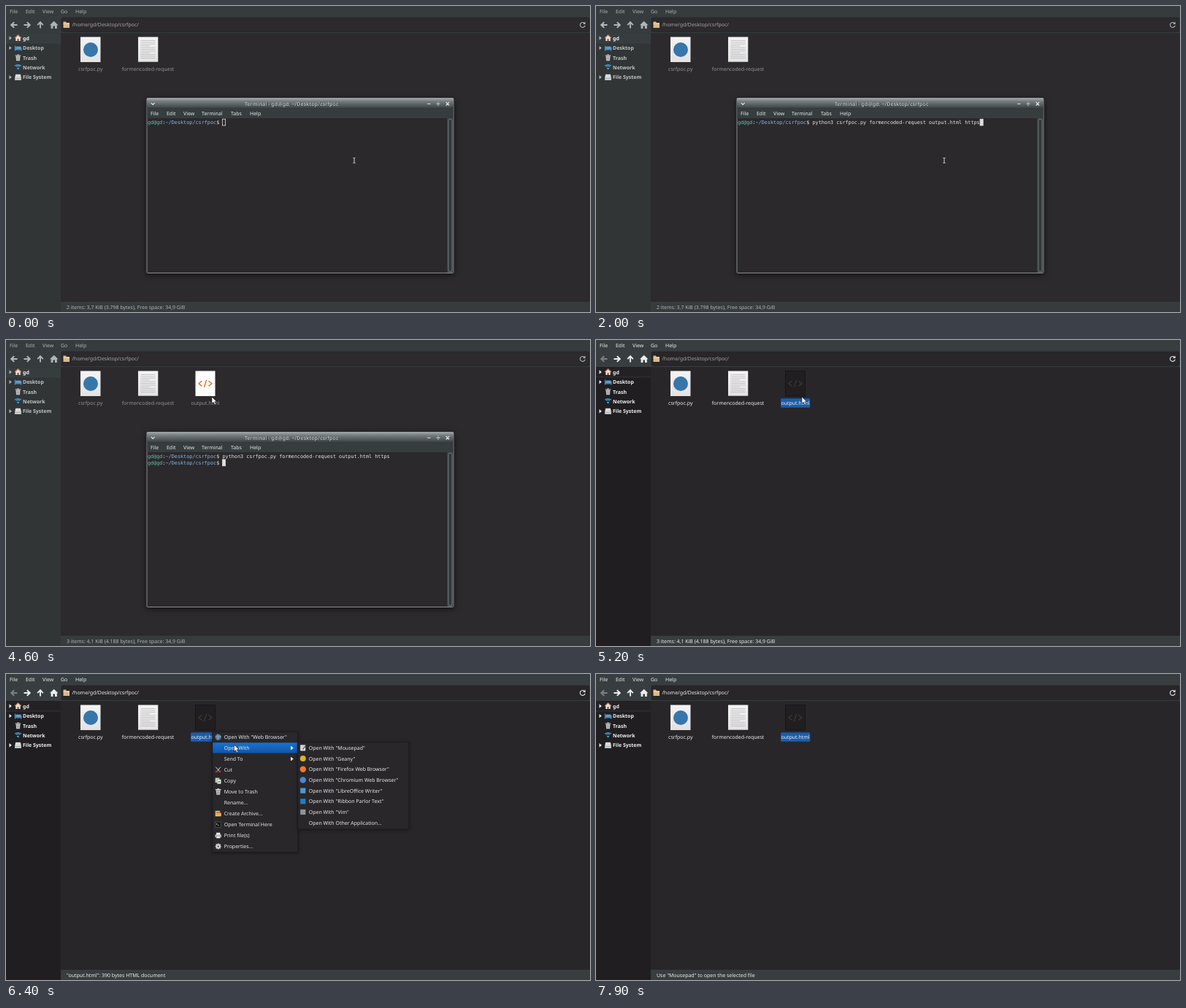
Write an HTML page that moves like this. It is 800 by 420 pixels and loops after 8000 ms.

```html
<!DOCTYPE html>
<html lang="en">
<head>
<meta charset="utf-8">
<title>File manager and terminal</title>
<style>
html, body { margin: 0; width: 100%; height: 100%; overflow: hidden; background: #282629; }
svg { display: block; width: 100vw; height: 100vh; font: 6.97px "Noto Sans", sans-serif; text-rendering: geometricPrecision;
  --bar: #363c3e; --side: #323536; --row: #373d3f; --bg: #2c2a2d; --text: #afb5b7; --label: #929193; --bold: #c0c7c9; --back: #b4babc; --path: #a4a4a6; }
svg.focused { --bar: #383e40; --side: #201e20; --row: #232123; --bg: #282629; --text: #eceeee; --label: #eceeee; --bold: #f0f2f2; --back: #7c8082; }
text { fill: var(--text); white-space: pre; }
.bold { font-weight: 700; }
.mono { font: 6.81px "DejaVu Sans Mono", monospace; fill: #e4e4e4; }
.light { fill: #e8eaea; }
</style>
</head>
<body>
<svg id="stage" viewBox="0 0 800 420" preserveAspectRatio="none">
  <defs>
    <linearGradient id="title" x2="0" y2="1">
      <stop stop-color="#a4a9aa"/><stop offset=".3" stop-color="#777d7f"/><stop offset="1" stop-color="#3a4143"/>
    </linearGradient>
    <linearGradient id="blue" x2="0" y2="1"><stop stop-color="#1c70cf"/><stop offset="1" stop-color="#0d57ac"/></linearGradient>
    <linearGradient id="page" x2="0" y2="1"><stop stop-color="#f4f4f4"/><stop offset="1" stop-color="#e2e2e2"/></linearGradient>
  </defs>
  <g id="manager"></g>
  <g id="terminal" style="filter:drop-shadow(0 2px 4px #0009)"></g>
  <g id="menu"></g>
  <g id="submenu"></g>
  <path id="ibeam" d="M-1.5-3.5h1.2M.3-3.5h1.2M0-3.2v6.4M-1.5 3.5h1.2M.3 3.5h1.2" stroke="#eee" stroke-width=".9"/>
  <path id="arrow" d="M0 0V9.2L2.2 7.3 3.8 10.8 5.4 10 3.9 6.7H6.7Z" fill="#fff" stroke="#151515" stroke-width=".6"/>
</svg>
<script>
const $ = id => document.getElementById(id);
const USER = "gd";
const COMMAND = "python3 csrfpoc.py formencoded-request output.html https";
const CHAR = 4.1, PROMPT_X = 194, COMMAND_X = 296.5, ROW = 8.8;

const text = (x, y, s, attrs = "") => `<text x="${x}" y="${y}" ${attrs}>${s}</text>`;
const rect = (x, y, w, h, fill, attrs = "") => `<rect x="${x}" y="${y}" width="${w}" height="${h}" fill="${fill}" ${attrs}/>`;
const dot = (x, y, r, fill) => `<circle cx="${x}" cy="${y}" r="${r}" fill="${fill}"/>`;
const fill = (d, color, attrs = "") => `<path d="${d}" fill="${color}" ${attrs}/>`;
const line = (d, color, width = 1, attrs = "") => `<path d="${d}" fill="none" stroke="${color}" stroke-width="${width}" ${attrs}/>`;
const at = (x, y, content) => `<g transform="translate(${x} ${y})">${content}</g>`;
const row = (items, y, attrs) => items.map(([x, s]) => text(x, y, s, attrs)).join("");

// Small icons, centred on their own origin
const trash = fill("M-3-2H3L2.4 4.2H-2.4Z", "#c9cccd") + line("M-3.8-3H3.8M-1-4H1", "#dfe1e2", 1.1) + line("M-1-1V3.4M1-1V3.4", "#606466", .6);
const house = fill("M-4.5 0 0-4.3 4.5 0H3.2V4H-3.2V0Z", "#e6e1dc") + line("M-4.5 0 0-4.2 4.5 0", "#d3754a", 1.2) + rect(-1, 1, 2, 3, "#8c4a32");
const desktop = line("M-4-3V4M-4 2.3H4.3V4M-4 0H4.3V2.3", "#4d94cb", 1.2) + rect(-3, -2, 7, 3.6, "#5b9fd2");
const network = [4.4, 2.8].map(r => line(`M${-r} ${1 - r * .75}Q0 ${-r * 1.2} ${r} ${1 - r * .75}`, "#45a1dc", 1.2)).join("") + fill("M-1.8 1Q0-.6 1.8 1L0 3.2Z", "#45a1dc");
const drive = fill("M-3.4-4H3.4L4.4 1V4H-4.4V1Z", "#d9dbdc") + line("M-4.2 1.5H4.2", "#8b8f91", .7);
const browser = dot(0, 0, 4.2, "#587b96") + line("M-3.8-1Q0 1 3.8-1M-1-4Q1.8 0-1 4", "#a5bccb", .7);
const scissors = line("M-3.4-4 1.8 2M3.4-4-1.8 2", "#d8dadb", 1) + line("M-2.4 1.2l-1 2.2M2.4 1.2l1 2.2M-2.2 1.8-1 3M2.2 1.8 1 3", "#c93535", 1.5);
const copy = rect(-4, -4, 5.6, 6.4, "#cfd5d0") + rect(-1.5, -1.8, 5.4, 6, "#f1f3f0", 'stroke="#5f8a5b" stroke-width=".6"') + rect(0, .3, 2.4, 2, "#5d9b56");
const archive = rect(-4, -3.8, 6.5, 3, "#e4bd4d") + rect(-4, -.7, 8, 4.4, "#f0cf5b") + rect(-2.5, -2, 6, 1.5, "#cd4c36") + line("M-4 1.4H4", "#aa7a25", .7);
const shell = rect(-4, -3.6, 8, 7.2, "#151617", 'stroke="#6d7072" stroke-width=".5"') + line("M-2.8-1.8l1.4 1.1-1.4 1.1M-.8.8H1", "#e6e6e6", .7);
const printer = rect(-2.6, -3.8, 5.2, 3.2, "#f2f2f2") + rect(-4.2, -1.2, 8.4, 3.8, "#c4c7c8") + rect(-2.6, 1, 5.2, 2.8, "#f5f5f5", 'stroke="#555" stroke-width=".4"');
const gear = line("M-4 0H4M0-4V4M-2.9-2.9 2.9 2.9M-2.9 2.9 2.9-2.9", "#d5d7d8", 1.7) + dot(0, 0, 3, "#d5d7d8") + dot(0, 0, 1.2, "#555");
const notepad = rect(-3.6, -4, 7, 8, "#e6e7e4") + line("M-2.4-2H2M-2.4 0H1M-2.4 2H0", "#9a9d9d", .6) + line("M0 2 3.6-3", "#555", 1.2);
const square = color => rect(-3.6, -3.6, 7.2, 7.2, color);

function drawManager() {
  const sidebar = [["Desktop", desktop], ["Trash", trash], ["Network", network], ["File System", drive]];
  const expander = y => fill(`M4.5 ${y - 2.7} 7.8 ${y} 4.5 ${y + 2.7}Z`, "var(--text)");
  const toolArrow = (x, angle, color) =>
    `<g transform="translate(${x} 26) rotate(${angle})">${line("M-4.5 0H3.5M-.2-3.8 3.8 0-.2 3.8", color, 1.9)}</g>`;
  const textPage = Array.from({ length: 11 }, (_, i) =>
    line(`M184.5 ${47.5 + i * 2.4}H${i % 4 == 3 ? 197 : 204.5}`, "#b4b4b4", .7)).join("");
  const label = (x, s) => text(x, 88.7, s, 'text-anchor="middle" style="fill:var(--label)"');

  $("manager").innerHTML =
    rect(0, 0, 800, 420, "var(--bg)") + rect(0, 0, 800, 37, "var(--bar)") +
    rect(0, 37, 75, 383, "var(--side)") + rect(0, 37.5, 75, 13, "var(--row)") +
    line("M0 50.8H75", "#454a4b", .5) + rect(75, 406, 725, 14, "var(--bar)") +
    rect(76, 16, 723, 19.5, "var(--bg)", 'rx="2" stroke="#222426" stroke-width=".7"') +
    row([[5, "File"], [27, "Edit"], [50, "View"], [75, "Go"], [95, "Help"]], 9.7) +
    toolArrow(11, 180, "var(--back)") + toolArrow(29, 0, "var(--text)") + toolArrow(47, -90, "var(--text)") +
    fill("M60 26.3 65.7 20.8 71.4 26.3H69.8V31H67V27.6H64.4V31H61.6V26.3Z", "var(--text)") +
    fill("M78.5 21.5H82L83 23H87V30H78.5Z", "#d9b98c") + line("M78.5 24.5H87", "#f0dcc0", .8) +
    text(90.5, 28.3, `/home/${USER}/Desktop/csrfpoc/`, 'style="fill:var(--path)"') +
    line("M792.5 23.8A3.4 3.4 0 1 0 793.2 26.6", "var(--text)", 1.1) + fill("M793.6 21.6V25H790.2Z", "var(--text)") +
    expander(44) + at(16.5, 44, house) + text(23, 46.6, USER, 'class="bold" style="fill:#f0f2f2"') +
    sidebar.map(([name, icon], i) => {
      const y = 57.6 + i * 13.4;
      return (i % 3 ? "" : expander(y)) + at(16.5, y, icon) + text(23, y + 2.6, name, 'class="bold" style="fill:var(--bold)"');
    }).join("") +
    rect(102, 42.5, 27.5, 34.5, "url(#page)") + dot(116, 60, 10, "#3776ab") + label(115.8, "csrfpoc.py") +
    rect(181, 42.5, 27.3, 34.2, "url(#page)") + textPage + label(194.5, "formencoded-request") +
    `<g id="output">${rect(253, 80.2, 40.3, 12.6, "#1a5dad", 'id="selection" rx="1.5"')}
      ${rect(259.5, 42.5, 27, 34.5, "#fff", 'id="outputPage"')}
      <g id="tag">${line("M268.5 56.2 264 59.8 268.5 63.4M277.5 56.2 282 59.8 277.5 63.4M274.6 54.6 271.4 65", "currentColor", 1.4)}</g>
      ${label(273, "output.html")}</g>` +
    text(83, 415.6, "", 'id="status"');
}

function drawTerminal() {
  const prompt = y => text(PROMPT_X, y, `<tspan fill="#64c3ac">${USER}@${USER}</tspan>:<tspan fill="#8ab6ea">~/Desktop/csrfpoc</tspan>$`, 'class="mono bold"');
  const titleAttrs = 'class="bold" text-anchor="middle" style="font-size:7px;fill:';
  const title = `Terminal - ${USER}@${USER}: ~/Desktop/csrfpoc`;
  $("terminal").innerHTML =
    rect(193, 126.5, 420, 240, "#2b292c", 'rx="1.5" stroke="#899193" stroke-width="1"') +
    rect(193, 126.5, 420, 14, "url(#title)") + rect(193.5, 140.5, 419, 13.5, "#363d3f") +
    text(391.8, 137.4, title, titleAttrs + '#222729"') + text(391.2, 136.8, title, titleAttrs + '#b5babb"') +
    line("M198.8 133 201.2 135.4 203.6 133M577 134.3H581.5M589.7 134.3H594.3M602.7 132 607.2 136.5M607.2 132 602.7 136.5", "#dfe3e4", 1.1) +
    dot(592, 132.1, .7, "#dfe3e4") + dot(592, 136.5, .7, "#dfe3e4") +
    row([[198, "File"], [220, "Edit"], [243, "View"], [268, "Terminal"], [308, "Tabs"], [334, "Help"]], 149.7, 'class="light"') +
    rect(604.5, 154, 8, 212, "#424a4c") + rect(606, 155.5, 5, 209, "#30383a", 'rx="2.2" stroke="#818a8c" stroke-width=".7"') +
    prompt(161.8) + text(COMMAND_X, 161.8, "", 'id="command" class="mono"') +
    `<g id="secondPrompt">${prompt(161.8 + ROW)}</g>` +
    rect(0, 155.2, 4.1, 8.8, "none", 'id="caret" stroke="#dedede" stroke-width=".8"');
}

function menuPanel(id, x, y, w, h, items, first, step, textX) {
  const iconX = textX - 8;
  $(id).innerHTML = rect(x, y, w, h, "#29272a", 'stroke="#1d1b1e" stroke-width=".8" style="filter:drop-shadow(0 1px 2px #0006)"') +
    rect(x + .5, 0, w - 1, 14.2, "url(#blue)", `id="${id}Hover"`) +
    items.map(([name, icon, more], i) => {
      const cy = first + i * step;
      return (icon ? at(iconX, cy, icon) : "") + text(textX, cy + 2.6, name, 'class="light"') +
        (more ? fill(`M390 ${cy - 2.8}L393.8 ${cy}L390 ${cy + 2.8}Z`, "#e8eaea") : "");
    }).join("");
}

function drawMenus() {
  menuPanel("menu", 282.8, 79.2, 117, 165.5, [
    ['Open With "Web Browser"', browser], ["Open With", "", true], ["Send To", "", true], ["Cut", scissors], ["Copy", copy],
    ["Move to Trash", trash], ["Rename..."], ["Create Archive...", archive], ["Open Terminal Here", shell],
    ["Print file(s)", printer], ["Properties...", gear]], 86.6, 15, 298.7);
  menuPanel("submenu", 399.8, 93.5, 152, 119.5, [
    ['Open With "Mousepad"', notepad], ['Open With "Geany"', dot(0, 0, 4, "#d9b13b")],
    ['Open With "Firefox Web Browser"', dot(0, 0, 4.2, "#f0782d")], ['Open With "Chromium Web Browser"', dot(0, 0, 4.2, "#4a86d8")],
    ['Open With "LibreOffice Writer"', square("#4f9ace")], ['Open With "Ribbon Parlor Text"', square("#1f7fc9")],
    ['Open With "Vim"', square("#8f9596")], ["Open With Other Application..."]], 101.4, 14.68, 414.8);
}

const show = (id, on) => $(id).style.display = on ? "" : "none";

// Value of the last [time, value] step already reached
const stepAt = (steps, t) => steps.filter(([start]) => start <= t).pop()[1];

const typedSteps = [[900, 11], [1000, 19], [1100, 39], [1200, 51], [1300, 56]];
const typedCount = t => t < 900 ? Math.floor(t / 100 * 1.375) : stepAt(typedSteps, t);

const FILE_INFO = '"output.html": 390 bytes HTML document';
const statusSteps = [
  [0, "2 items: 3,7 KiB (3.798 bytes), Free space: 34,9 GiB"],
  [3500, "3 items: 4,1 KiB (4.188 bytes), Free space: 34,9 GiB"],
  [5300, FILE_INFO], [5800, 'Use "Web Browser" to open the selected file'],
  [6200, FILE_INFO], [7400, 'Use "Mousepad" to open the selected file']];

const pointerPath = [[0, 477, 212], [3900, 477, 212], [4600, 282, 78], [5600, 282, 78], [5900, 293, 89],
  [6300, 302, 97], [7200, 396, 98], [7700, 424, 99], [8000, 424, 99]];

function pointerAt(t) {
  const i = pointerPath.findIndex(([end]) => end > t);
  const [t0, x0, y0] = pointerPath[i - 1], [t1, x1, y1] = pointerPath[i];
  let k = (t - t0) / (t1 - t0);
  if (t < 5000) k = k * k * (3 - 2 * k);
  return [x0 + (x1 - x0) * k, y0 + (y1 - y0) * k];
}

function render(t) {
  const focused = t >= 5100, entered = t >= 3300, typed = typedCount(t);
  $("stage").setAttribute("class", focused ? "focused" : "");
  $("stage").style.setProperty("--path", t >= 5300 ? "#eceeee" : "#a4a4a6");
  $("status").textContent = stepAt(statusSteps, t);

  show("terminal", !focused);
  $("command").textContent = COMMAND.slice(0, typed);
  show("secondPrompt", entered);
  $("caret").setAttribute("fill", t < 100 ? "none" : "#dedede");
  $("caret").setAttribute("x", COMMAND_X + (entered ? 0 : typed * CHAR));
  $("caret").setAttribute("y", 155.2 + (entered ? ROW : 0));

  show("output", t >= 3500);
  show("selection", focused);
  $("outputPage").setAttribute("fill", focused ? "#201e20" : "#fff");
  $("outputPage").setAttribute("stroke", focused ? "#171617" : "none");
  $("tag").style.color = focused ? "#40362f" : "#e2702b";

  show("menu", t >= 5400 && t < 7800);
  show("menuHover", t >= 5700);
  $("menuHover").setAttribute("y", t < 6200 ? 79.7 : 94.3);
  show("submenu", t >= 6400 && t < 7800);
  show("submenuHover", t >= 7400);
  $("submenuHover").setAttribute("y", 94.2);

  const [x, y] = pointerAt(t), overTerminal = !focused && y > 154;
  show("ibeam", overTerminal);
  show("arrow", !overTerminal && t < 7800);
  for (const id of ["ibeam", "arrow"]) $(id).setAttribute("transform", `translate(${x} ${y})`);
}

drawManager();
drawTerminal();
drawMenus();
const started = performance.now();
function tick() {
  render(Math.floor((performance.now() - started) % 8000 / 100) * 100);
  requestAnimationFrame(tick);
}
render(0);
requestAnimationFrame(tick);
</script>
</body>
</html>
```
